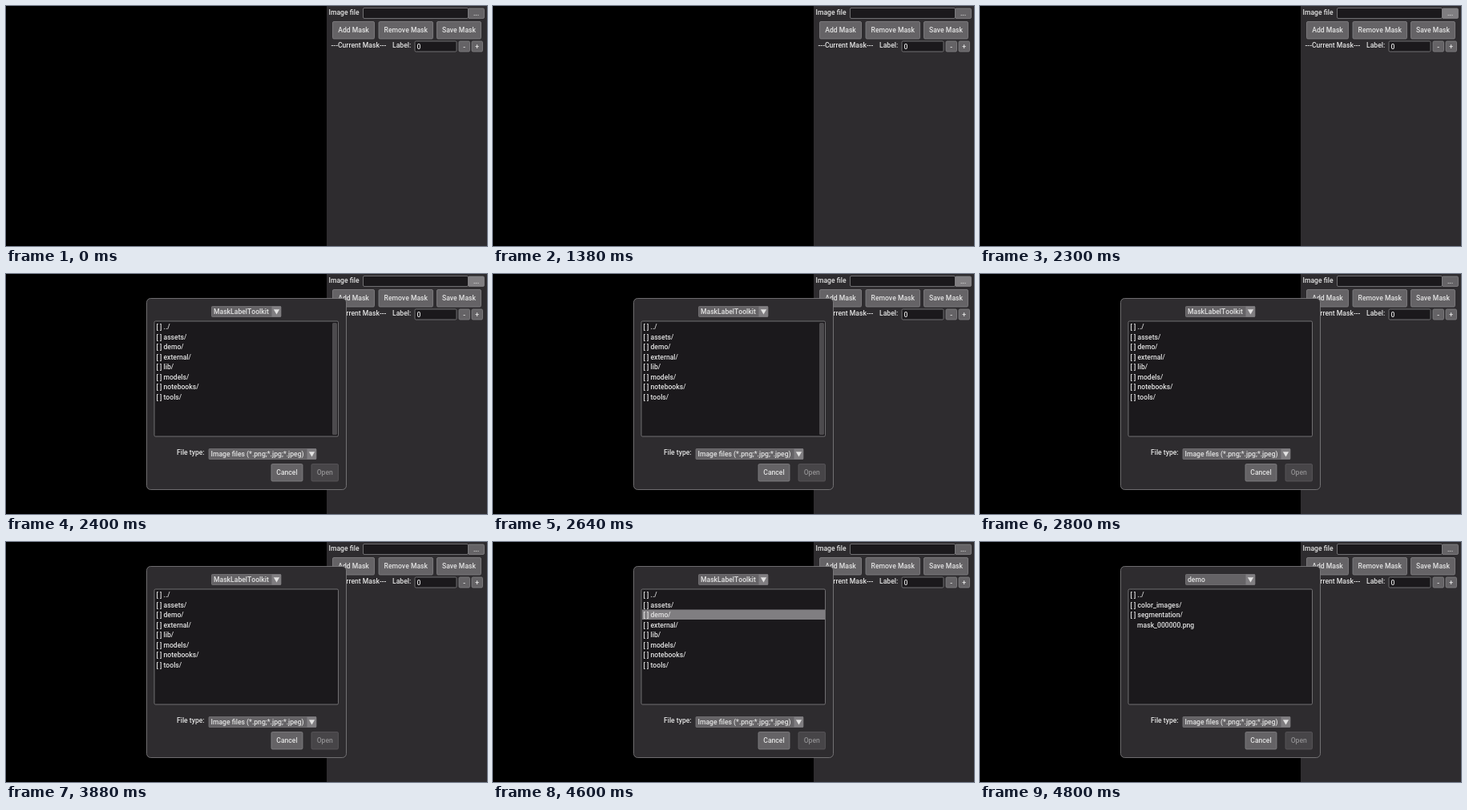
Write an HTML page with a canvas that moves like this. It is 600 px wide and 300 px high and loops after 5 s.

```html
<!DOCTYPE html>
<html lang="en">
<head>
<meta charset="utf-8">
<title>Mask labelling panel</title>
<style>
html, body { margin: 0; width: 100%; height: 100%; overflow: hidden; background: #000; }
canvas { display: block; width: 600px; height: 300px; }
</style>
</head>
<body>
<canvas id="stage" width="600" height="300"></canvas>
<script>
const ctx = document.getElementById("stage").getContext("2d");
const LOOP = 5000;
const HOVER = 2300, OPEN = 2400, SETTLE = 2800, SELECT = 4600, ENTER = 4800;

const PANEL = "#2e2c2f", FIELD = "#1b191c", BUTTON = "#656366";
const LIT = "#807e81", BORDER = "#858386", TEXT = "#e2e2e2";
const DIM = { fill: "#474548", border: "#5b595c", text: "#8f8e90" };

const ROOT = ["../", "assets/", "demo/", "external/", "lib/", "models/", "notebooks/", "tools/"];
const DEMO = ["../", "color_images/", "segmentation/"];
const asFolder = name => "[ ] " + name;

function box(x, y, w, h, fill, border = BORDER, radius = 1.5) {
  ctx.beginPath();
  ctx.roundRect(x + 0.5, y + 0.5, w - 1, h - 1, radius);
  ctx.fillStyle = fill;
  ctx.fill();
  if (border) {
    ctx.strokeStyle = border;
    ctx.lineWidth = 0.8;
    ctx.stroke();
  }
}

function label(text, x, y, align = "left", color = TEXT) {
  ctx.textAlign = align;
  ctx.fillStyle = color;
  ctx.fillText(text, x, y);
}

function button(text, x, y, w, h, fill = BUTTON, border = BORDER, color = TEXT) {
  box(x, y, w, h, fill, border);
  label(text, x + w / 2, y + h / 2 + 3, "center", color);
}

function combo(text, x, y, w) {
  const h = 14, mid = x + w - 6, cy = y + h / 2;
  box(x, y, w, h, BUTTON, "#777578", 1);
  ctx.fillStyle = LIT;
  ctx.fillRect(x + w - 12, y + 0.5, 11.5, h - 1);
  ctx.fillStyle = TEXT;
  ctx.beginPath();
  ctx.moveTo(mid - 3.6, cy - 2.8);
  ctx.lineTo(mid + 3.6, cy - 2.8);
  ctx.lineTo(mid, cy + 3.4);
  ctx.fill();
  label(text, x + 3, y + 10.2);
}

function drawPanel(t) {
  ctx.fillStyle = PANEL;
  ctx.fillRect(400, 0, 200, 300);
  label("Image file", 402.5, 11);
  box(445, 2, 132, 14, FIELD);
  const lit = t >= HOVER && t < SETTLE;
  button("...", 576, 2.5, 21, 13.5, lit ? LIT : BUTTON);
  button("Add Mask", 407, 19, 53, 22.5);
  button("Remove Mask", 464.5, 19, 68.5, 22.5);
  button("Save Mask", 537, 19, 56, 22.5);
  label("---Current Mask---", 405.5, 52);
  label("Label:", 482, 52);
  box(509.5, 43.5, 53, 14, FIELD);
  label("0", 512.5, 54);
  button("-", 564.5, 43.5, 14.5, 14);
  button("+", 580.5, 43.5, 14.5, 14);
}

function drawDialog(t) {
  const inside = t >= ENTER;
  box(175, 30, 250, 240, PANEL, BORDER, 5);
  combo(inside ? "demo" : "MaskLabelToolkit", 256, 40, 87.5);
  box(184.5, 58.5, 230.5, 145, FIELD);

  if (t < SETTLE) {
    ctx.fillStyle = "#4d4b4e";
    ctx.beginPath();
    ctx.roundRect(407, 61, 6, 140, 1.5);
    ctx.fill();
  }
  if (t >= SELECT && !inside) {
    ctx.fillStyle = LIT;
    ctx.fillRect(186, 84.5, 228, 12.5);
  }

  const rows = inside
    ? [...DEMO.map(asFolder), "    mask_000000.png"]
    : ROOT.map(asFolder);
  rows.forEach((row, i) => label(row, 187.5, 69 + i * 12.5));

  label("File type:", 213, 226.3);
  combo("Image files (*.png;*.jpg;*.jpeg)", 252.5, 218, 135);
  button("Cancel", 330.5, 237, 40, 22.5);
  button("Open", 380.5, 237, 34.5, 22.5, DIM.fill, DIM.border, DIM.text);
}

function draw() {
  const t = performance.now() % LOOP;
  ctx.font = "500 8.6px Roboto, sans-serif";
  ctx.fontKerning = "none";
  ctx.fillStyle = "#000";
  ctx.fillRect(0, 0, 600, 300);
  drawPanel(t);
  if (t >= OPEN) drawDialog(t);
  requestAnimationFrame(draw);
}
draw();
</script>
</body>
</html>
```
